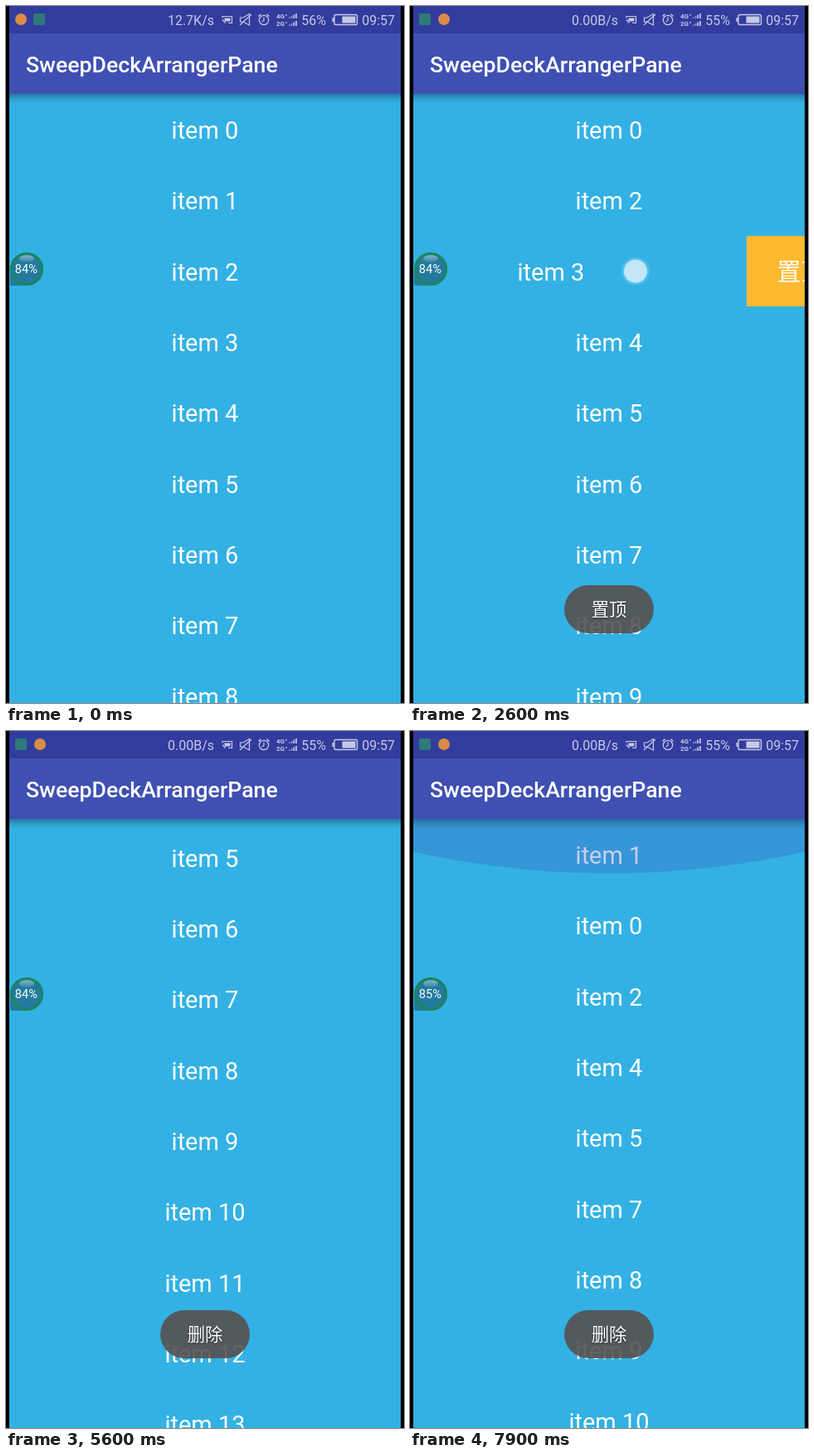
Write an HTML page with a canvas that moves like this. It is 480 by 840 pixels and loops after 8000 ms.

```html
<!DOCTYPE html>
<html lang="zh-CN">
<head>
<meta charset="utf-8">
<title>Swipe list</title>
<style>
html, body { margin: 0; width: 100%; height: 100%; overflow: hidden; background: #000; }
canvas { display: block; width: 480px; height: 840px; }
</style>
</head>
<body>
<canvas id="stage" width="480" height="840"></canvas>
<script>
const ctx = document.getElementById('stage').getContext('2d');
const LOOP = 8000, STEP = 100;
const W = 480, H = 840, LEFT = 4, RIGHT = 476, MID = W / 2;
const BAR = 33, TOP = 106.3, PITCH = 85.33, BUTTON = 131, OPEN = BUTTON * 2;
const FONT = 'Roboto, "Noto Sans CJK SC", "Noto Sans CJK", sans-serif';
const BLUE = '#33b1e4', PALE = '#c6c9e6', DIM = '#8d94cb';
const BUTTONS = [
  { text: '置顶', color: '#fdb930' },
  { text: '删除', color: '#ff4444' }
];

// A row is swiped open at `at` and closed at `tap`; a button tap also removes it.
// `pace` scales the length of every phase.
const gestures = [
  { id: 1, at: 430, tap: 1500, pace: 1, grip: 342, button: 0 },
  { id: 3, at: 2427, tap: 3227, pace: 1, grip: 342, button: 1 },
  { id: 5, at: 4110, tap: 4581, pace: 0.9, grip: 342, away: { x: 334, y: 645 } },
  { id: 6, at: 6778, tap: 6980, pace: 0.4, grip: 426, button: 1 }
];
const removals = gestures.filter(g => !g.away);

// Scroll distance in rows
const scrolls = [
  { at: 4950, time: 850, rows: 3.4 },
  { at: 5890, time: 310, rows: -1.46 },
  { at: 7480, time: 370, rows: -2.94 }
];

const clamp = v => Math.max(0, Math.min(1, v));
const ramp = (t, at, time) => clamp((t - at) / time);
const ease = (t, at, time) => (1 - Math.cos(Math.PI * ramp(t, at, time))) / 2;

const openness = (g, t) =>
  OPEN * (ease(t, g.at, 500 * g.pace) - ease(t, g.tap, 200 * g.pace));
const fadeOut = (g, t) => ease(t, g.tap + 233 * g.pace, 120 * g.pace);
const closeGap = (g, t) => ease(t, g.tap + 353 * g.pace, 250 * g.pace);
const toastStart = g => g.tap + 480 * g.pace;
const scrolled = (s, t) => s.rows * PITCH * ease(t, s.at, s.time);

function rowTop(id, t) {
  let slot = id;
  for (const g of removals) {
    if (g.id < id) slot -= closeGap(g, t);
    // The pinned row comes back above the first one
    if (g.id === id && g.button === 0 && closeGap(g, t) > 0.99) slot = -1;
  }
  return TOP + slot * PITCH - scrolls.reduce((sum, s) => sum + scrolled(s, t), 0);
}

function rect(x, y, w, h, color) {
  ctx.fillStyle = color;
  ctx.fillRect(x, y, w, h);
}

function disc(x, y, r, color) {
  ctx.fillStyle = color;
  ctx.beginPath();
  ctx.arc(x, y, r, 0, 7);
  ctx.fill();
}

function ring(x, y, r, width, color) {
  ctx.strokeStyle = color;
  ctx.lineWidth = width;
  ctx.beginPath();
  ctx.arc(x, y, r, 0, 7);
  ctx.stroke();
}

function pill(x, y, w, h, r, color) {
  ctx.fillStyle = color;
  ctx.beginPath();
  ctx.roundRect(x, y, w, h, r);
  ctx.fill();
}

function path(d, width = 1.2) {
  ctx.strokeStyle = PALE;
  ctx.lineWidth = width;
  ctx.stroke(new Path2D(d));
}

function label(str, x, y, size, color = '#fff', align = 'center', weight = 400) {
  ctx.font = `${weight} ${size}px ${FONT}`;
  ctx.textAlign = align;
  ctx.fillStyle = color;
  ctx.fillText(str, x, y);
}

function drawRow(id, t) {
  const top = rowTop(id, t);
  if (top > H || top < TOP - PITCH) return;
  const g = gestures.find(g => g.id === id);
  const y = Math.round(top), h = Math.round(top + PITCH) - y;
  const dx = g ? openness(g, t) : 0, edge = RIGHT - dx;
  const base = Math.round(top + 53.7);
  const gone = g && !g.away && top >= TOP - 1 && closeGap(g, t) <= 0.99;

  ctx.save();
  if (gone) ctx.globalAlpha = 1 - fadeOut(g, t);
  rect(LEFT, y, edge - LEFT, h, BLUE);
  label('item ' + id, MID - dx, base, 29);
  if (dx > 0) {
    BUTTONS.forEach(({ text, color }, i) => {
      const x = edge + i * BUTTON;
      rect(x, y, BUTTON, h, color);
      label(text, x + BUTTON / 2, base, 29);
    });
  }
  if (g && t > g.at - 80 && t < g.at + 100) rect(LEFT, y, RIGHT - LEFT, h, 'rgba(255,255,255,.17)');
  ctx.restore();
}

function drawGlow(t) {
  const u = ramp(t, 7700, 200);
  if (!u) return;
  const half = (RIGHT - LEFT) / 2, sag = 26 * u;
  const r = (half * half + sag * sag) / (2 * sag);
  disc(MID, 106 + 65.5 * u - r, r, `rgba(63,81,181,${0.28 * u})`);
}

function drawHeader() {
  rect(LEFT, BAR, RIGHT - LEFT, 106 - BAR, '#3f50b2');
  label('SweepDeckArrangerPane', 24, 79.5, 26.67, '#fff', 'left', 500);
  const g = ctx.createLinearGradient(0, 106, 0, 118);
  [0.36, 0.13, 0].forEach((a, i) => g.addColorStop(i / 2, `rgba(0,30,50,${a})`));
  rect(LEFT, 106, RIGHT - LEFT, 12, g);
}

function drawStatus(t) {
  const later = t >= 800, base = 22.5;
  const speed = !later ? '12.7K/s' : t >= 6600 && t < 7300 ? '703B/s' : '0.00B/s';
  rect(LEFT, 0, RIGHT - LEFT, BAR, '#313c9d');
  disc(later ? 41 : 18, 16, 7, '#dc8c46');
  pill(later ? 11 : 33, 9, 14, 14, 2, '#2d7a78');
  label(speed, 251, base, 16, PALE, 'right');
  label(later ? '55%' : '56%', 386, base, 16, PALE, 'right');
  label('09:57', 469, base, 16, PALE, 'right');

  // cast
  path('M261 14.5V12.5H272.5V20.5H268M261 16.5L264.5 20.5');
  rect(263.5, 14.5, 7, 4, PALE);
  // muted speaker
  path('M282.5 14H286L293.5 9.5V23L286 19H282.5ZM282 23L296 10');
  // alarm
  ring(311, 17, 5.7, 1.2, PALE);
  path('M311 13.5V17.5L308.5 19');
  path('M304.5 12.5L307.5 9.8M314.5 9.8L317.5 12.5', 1.5);
  // signal meters
  ['4G', '2G'].forEach((name, i) => {
    const y = 15 + i * 9;
    label(name, 326, y, 8, PALE, 'left', 700);
    rect(337, y - 5, 2, 2, DIM);
    for (let k = 0; k < 4; k++) {
      const h = 1.5 * (k + 1);
      rect(341 + k * 2.7, y - h, 1.7, h, k < 2 ? DIM : PALE);
    }
  });
  // battery
  path('M398 10.5H422Q423.5 10.5 423.5 12V21Q423.5 22.5 422 22.5H398Q396 22.5 396 21V12Q396 10.5 398 10.5Z', 1.4);
  rect(393.5, 14, 2, 5, PALE);
  rect(405.5, 12.5, 16, 8, PALE);
}

function drawBubble(t) {
  const x = 25, y = 317, r = 20;
  // round with a pointed lower left corner
  pill(x - r, y - r, r * 2, r * 2, [r, r, r, 2], 'rgba(0,0,0,.31)');
  ring(x, y, r - 1.5, 3, 'rgba(24,140,50,.6)');
  const g = ctx.createLinearGradient(0, 300, 0, 309);
  g.addColorStop(0, 'rgba(255,255,255,.45)');
  g.addColorStop(1, 'rgba(255,255,255,.08)');
  ctx.fillStyle = g;
  ctx.beginPath();
  ctx.ellipse(x, 304.5, 9, 4.2, 0, 0, 7);
  ctx.fill();
  label(t >= 7500 ? '85%' : '84%', 24.3, 322, 14.5);
}

function drawToast(t) {
  const g = removals.filter(g => t >= toastStart(g)).pop();
  if (!g) return;
  const start = toastStart(g);
  ctx.save();
  ctx.globalAlpha = ramp(t, start, 120) * (1 - ramp(t, start + 2870, 230));
  pill(186, 698, 108, 58, 29, 'rgba(86,80,78,.89)');
  ctx.shadowColor = 'rgba(0,0,0,.6)';
  ctx.shadowBlur = 2;
  ctx.shadowOffsetY = 1;
  label(BUTTONS[g.button].text, MID, 735, 21.33);
  ctx.restore();
}

function drawTouch(t, from, to, x, y) {
  if (t < from || t > to) return;
  ctx.save();
  ctx.globalAlpha = ramp(t, from, 140);
  const g = ctx.createRadialGradient(x, y, 13, x, y, 18);
  g.addColorStop(0, 'rgba(150,220,250,.6)');
  g.addColorStop(1, 'rgba(150,220,250,0)');
  disc(x, y, 18, g);
  disc(x, y, 13.8, '#c4e7f6');
  ctx.restore();
}

function drawTouches(t) {
  for (const g of gestures) {
    const y = rowTop(g.id, t) + PITCH / 2;
    drawTouch(t, g.at - 20, g.at + 400 * g.pace, g.grip - openness(g, t), y);
    const spot = g.away || { x: RIGHT - OPEN + BUTTON * (g.button + 0.5), y };
    drawTouch(t, g.tap - 150 * g.pace, g.tap + 80 * g.pace, spot.x, spot.y);
  }
  for (const s of scrolls) {
    drawTouch(t, s.at, s.at + s.time * 0.6, 330, 480 - scrolled(s, t));
  }
}

function draw(t) {
  rect(0, 0, W, H, '#000');
  ctx.save();
  ctx.beginPath();
  ctx.rect(LEFT, 0, RIGHT - LEFT, H);
  ctx.clip();
  rect(LEFT, 0, RIGHT - LEFT, H, '#eee');
  for (let id = 0; id < 19; id++) drawRow(id, t);
  drawGlow(t);
  drawHeader();
  drawStatus(t);
  drawToast(t);
  drawBubble(t);
  drawTouches(t);
  ctx.restore();
}

const start = performance.now();
function tick() {
  const t = (performance.now() - start) % LOOP;
  draw(Math.floor(t / STEP) * STEP);
  requestAnimationFrame(tick);
}
tick();
</script>
</body>
</html>
```
